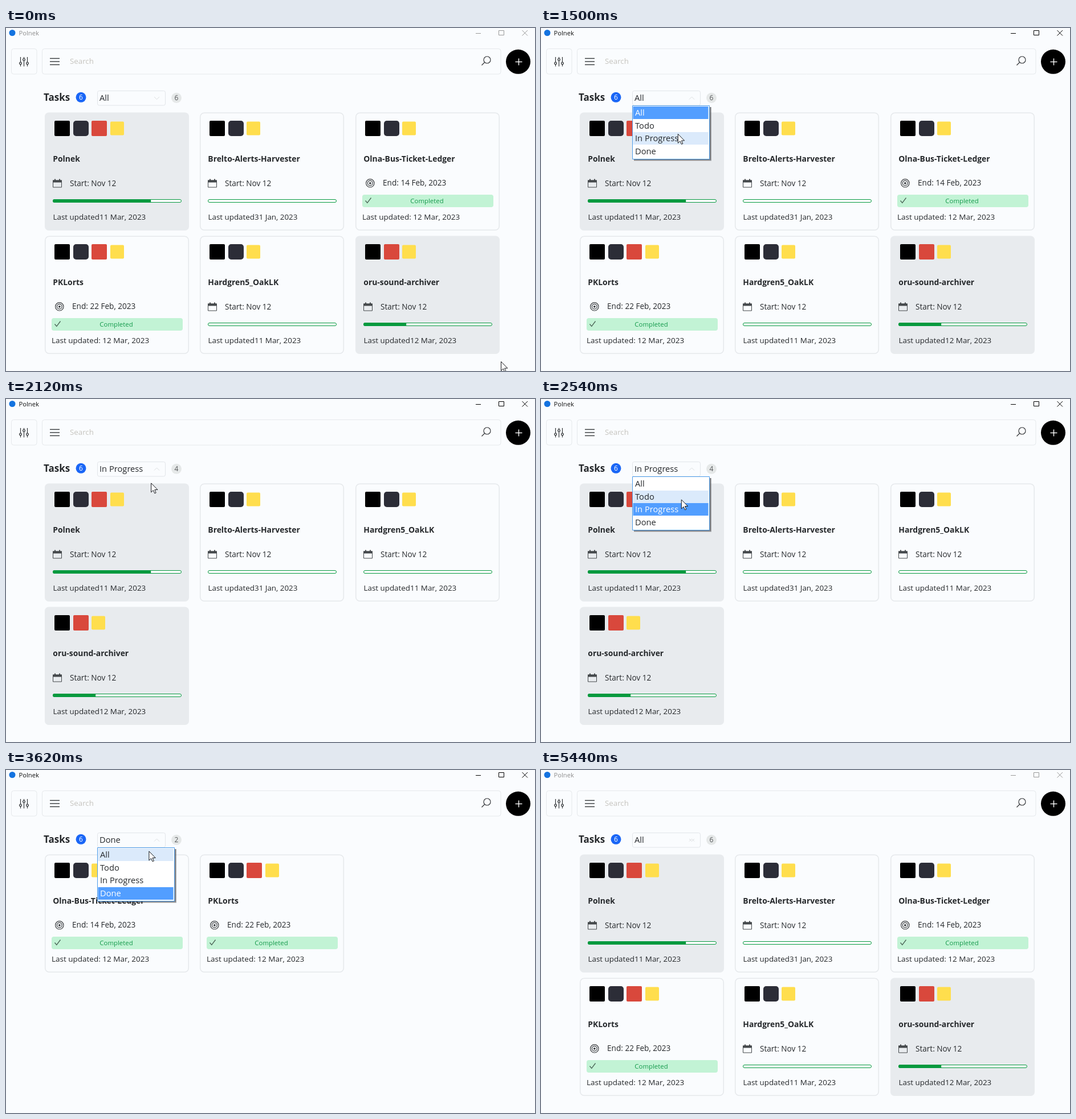
Animation, 928 px wide and 603 px high, one loop 5.52 s. Source, as an HTML page with a canvas:

```html
<!DOCTYPE html>
<html lang="en">
<head>
<meta charset="utf-8">
<title>Task board</title>
<style>
  html, body { margin: 0; width: 100%; height: 100%; overflow: hidden; background: #fafcfe; }
  canvas { display: block; width: 928px; height: 603px; }
</style>
</head>
<body>
<canvas id="stage"></canvas>
<script>
const W = 928, H = 603, LOOP = 5520, STEP = 60;
const BG = '#fafcfe', GRAY = '#e8ebee', EDGE = '#e6e9ec', INK = '#25282b', GREEN = '#079a3f';
const FONT = '"Open Sans", "Noto Sans", sans-serif';

const canvas = document.getElementById('stage');
const dpr = window.devicePixelRatio || 1;
canvas.width = W * dpr;
canvas.height = H * dpr;
const ctx = canvas.getContext('2d');

const OPTIONS = ['All', 'Todo', 'In Progress', 'Done'];
const TILE = { code: '#000000', draw: '#2c2d37', tick: '#d9483c', dir: '#ffde4d' };
const TASKS = [
  { name: 'Polnek', apps: 'code draw tick dir', done: 0.762, date: '11 Mar, 2023', shaded: true },
  { name: 'Brelto-Alerts-Harvester', apps: 'code draw dir', date: '31 Jan, 2023' },
  { name: 'Olna-Bus-Ticket-Ledger', apps: 'code draw dir', end: '14 Feb, 2023', date: '12 Mar, 2023' },
  { name: 'PKLorts', apps: 'code draw tick dir', end: '22 Feb, 2023', date: '12 Mar, 2023' },
  { name: 'Hardgren5_OakLK', apps: 'code draw dir', date: '11 Mar, 2023' },
  { name: 'oru-sound-archiver', apps: 'code tick dir', done: 0.333, date: '12 Mar, 2023', shaded: true }
];

// Each round: go to the select box, open the list, move to an option, pick it.
const ROUNDS = [
  { reach: 60, arrive: 660, open: 720, leave: 1200, pick: 1620, option: 2 },
  { reach: 1800, arrive: 2300, open: 2300, leave: 2300, pick: 2740, option: 3 },
  { reach: 2960, arrive: 3200, open: 3440, leave: 3440, pick: 3860, option: 0 }
];
const FADE_OUT = 120, FADE_IN = 150, BLUR = 5400;
const HOME = [868, 586], ARROW = [264, 121], EXIT = [862, 612];
const spot = option => [243 - 3.5 * option, 154 + 21 * option];

const MOVES = ROUNDS.flatMap(r => [
  [r.reach, r.arrive, ARROW],
  [r.leave, r.leave + 300 + 45 * r.option, spot(r.option)]
]).concat([[4620, 5140, EXIT]]);

const VIEWS = [{ option: 0, since: -LOOP }]
  .concat(ROUNDS.map(r => ({ option: r.option, since: r.pick + FADE_OUT })));
const LAST = VIEWS[ROUNDS.length].since;

const ramp = (t, a, b) => Math.max(0, Math.min(1, (t - a) / (b - a)));
const smooth = v => v * v * (3 - 2 * v);

function snap(t) {
  const base = t < ROUNDS[1].open ? 0 : ROUNDS[1].open;
  return base + Math.floor((t - base) / STEP) * STEP;
}

function pointerAt(t) {
  return MOVES.reduce(([x, y], [from, to, [tx, ty]]) => {
    const k = smooth(ramp(t, from, to));
    return [x + (tx - x) * k, y + (ty - y) * k];
  }, HOME);
}

function viewAt(t) {
  const i = VIEWS.filter(v => v.since < t).length - 1;
  const { option, since } = VIEWS[i];
  const out = i < ROUNDS.length ? ramp(t, ROUNDS[i].pick, ROUNDS[i].pick + FADE_OUT) : 0;
  const tasks = TASKS.filter(task => option === 0 || (option === 3) === Boolean(task.end));
  return { option, tasks, alpha: ramp(t, since, since + FADE_IN) * (1 - out) };
}

function text(str, x, y, size, color = INK, weight = 400, align = 'left') {
  ctx.font = `${weight} ${size}px ${FONT}`;
  ctx.fillStyle = color;
  ctx.textAlign = align;
  ctx.fillText(str, x, y);
}

function paint(fill, stroke, width) {
  if (fill) { ctx.fillStyle = fill; ctx.fill(); }
  if (stroke) { ctx.strokeStyle = stroke; ctx.lineWidth = width; ctx.stroke(); }
}

function box(x, y, w, h, r, fill, stroke, width = 1) {
  ctx.beginPath();
  ctx.roundRect(x, y, w, h, r);
  paint(fill, stroke, width);
}

function disc(x, y, r, fill, stroke, width = 1) {
  ctx.beginPath();
  ctx.arc(x, y, r, 0, Math.PI * 2);
  paint(fill, stroke, width);
}

function line(color, width, ...points) {
  ctx.beginPath();
  points.forEach(([x, y]) => ctx.lineTo(x, y));
  paint(null, color, width);
}

function hline(x, y, w, color, width) { line(color, width, [x, y], [x + w, y]); }
function vline(x, y, h, color, width) { line(color, width, [x, y], [x, y + h]); }

function titleBar(active) {
  const ink = active ? '#000' : '#999';
  disc(11, 8.5, 5.5, '#1473e0');
  text('Polnek', 22.5, 13, 11.2, active ? '#111' : '#8e8e8e');
  hline(824, 9.5, 9, ink, 1);
  box(864.5, 4.5, 9, 8, 0, null, ink);
  line(ink, 1, [905.5, 4], [915, 13.5]);
  line(ink, 1, [915, 4], [905.5, 13.5]);
}

function toolbar() {
  const dark = '#34373a';
  box(9.5, 36.5, 44.5, 44.5, 4, BG, EDGE);
  box(63.5, 36.5, 804.5, 44.5, 4, BG, EDGE);
  for (let i = 0; i < 3; i++) {
    const x = 25.5 + 6 * i;
    vline(x, 51, 16.5, dark, 1.2);
    disc(x, i === 1 ? 55.5 : 62, 1.9, BG, dark, 1.2);
    hline(77, 53.5 + 5.5 * i, 17, dark, 1.4);
  }
  text('Search', 112, 63, 13.3, '#c5c3be');
  disc(844, 56, 6, null, dark, 1.2);
  line(dark, 1.3, [839.5, 60.5], [834.5, 65.5]);
  disc(898.5, 59.3, 21.5, '#000');
  hline(893.5, 59.5, 12, '#fff', 1.4);
  vline(899.5, 53.5, 12, '#fff', 1.4);
}

function chevron(tip, ends) {
  line('#dcdfe1', 1, [260, ends], [264.5, tip], [269, ends]);
}

function heading(t, view) {
  text('Tasks', 66, 128, 17, INK, 700);
  disc(131.5, 121.8, 9, '#1a66f6');
  text('6', 131.5, 126, 12, '#fff', 400, 'center');

  box(160.5, 110.5, 119, 25.5, 3, BG, '#e2e5e9');
  text(OPTIONS[view.option], 164, 128, 14.7);
  if (t > LAST && t < 4680) vline(181.5, 114.5, 17, '#111', 1);
  if (t < ROUNDS[0].open || t > LAST) chevron(125.5, 121);
  if (t >= ROUNDS[0].open) chevron(121, 125.5);
  disc(299, 122.8, 9, '#e5e8e8');
  text(view.tasks.length, 299, 127, 12, '#55585a', 400, 'center');
}

function calendar(x, y) {
  const c = '#44484b';
  box(x + .5, y + 2.5, 15, 12, 0, null, c);
  box(x, y + 2, 16, 4, 0, c);
  for (const dx of [3, 11]) box(x + dx, y, 2, 4, 0, c);
}

function finished(task) {
  const dark = '#3b3e41';
  for (const r of [7.2, 4.4]) disc(25.8, 124.8, r, null, dark, 1.2);
  disc(25.8, 124.8, 1.9, dark);
  text('End: ' + task.end, 48, 129, 13.6);
  box(12, 145, 230, 22, 4, '#c2f3d5');
  line('#4c6658', 1.3, [17.5, 155.5], [20.8, 159.5], [27.5, 150.5]);
  text('Completed', 125.5, 160, 11.4, '#159a4c', 400, 'center');
  text('Last updated: ' + task.date, 12, 189, 13.5);
}

function ongoing(task) {
  calendar(14, 117.5);
  text('Start: Nov 12', 44, 130, 13.6);
  box(14.5, 153.5, 225, 5, 2.5, BG, GREEN);
  if (task.done) box(14, 153, 226 * task.done, 6, [3, 0, 0, 3], GREEN);
  text('Last updated' + task.date, 14.5, 189, 13.4);
}

function card(task, slot) {
  ctx.save();
  ctx.translate(68 + Math.round(slot % 3 * 272.25), 148 + Math.floor(slot / 3) * 217);
  if (task.shaded) box(0, .5, 253, 207.5, 7, GRAY);
  else box(.75, 1.25, 251.5, 206, 7, BG, EDGE, 1.6);
  task.apps.split(' ').forEach((app, i) => {
    const size = app === 'dir' ? 24 : 27;
    box(17 + Math.round(i * 32.6), 28.5 - size / 2, size, size, app === 'draw' ? 5 : 2, TILE[app]);
  });
  text(task.name, 14.3, 87, 13.9, INK, 700);
  (task.end ? finished : ongoing)(task);
  ctx.restore();
}

function menu(t, py) {
  const round = ROUNDS.findIndex(r => t >= r.open && t < r.pick);
  if (round < 0) return;
  const { open } = ROUNDS[round], selected = VIEWS[round].option;
  const rowH = 22.6, top = 138;
  const hover = Math.floor((py - top) / rowH);
  ctx.save();
  ctx.beginPath();
  ctx.rect(155, 136, 150, 100 * ramp(t, open - STEP, open + STEP));
  ctx.clip();
  for (const d of [3, 2]) box(163, 139, 133 + d, 91.5 + d, 0, 'rgba(60,64,68,.4)');
  box(160.5, 136.5, 135, 94, 0, '#fff', '#4a9bea');
  OPTIONS.forEach((name, i) => {
    const y = Math.round(top + i * rowH);
    const fill = i === selected ? '#529eff' : i === hover ? '#dbeafb' : null;
    box(161.5, y, 132, 22, 0, fill);
    text(name, 165, y + 16, 14.7, i === selected ? '#fff' : INK);
  });
  ctx.restore();
}

function pointer(x, y) {
  const shape = [[0, 0], [0, 16], [3.7, 12.5], [6.2, 18], [8.5, 17], [6.2, 11.6], [11.3, 11.6]];
  ctx.beginPath();
  shape.forEach(([dx, dy]) => ctx.lineTo(x + .5 + dx, y + .5 + dy));
  ctx.closePath();
  paint('#fff', '#15171c', 1);
}

function draw(t) {
  const [px, py] = pointerAt(t);
  const view = viewAt(t);
  ctx.setTransform(dpr, 0, 0, dpr, 0, 0);
  ctx.fillStyle = BG;
  ctx.fillRect(0, 0, W, H);
  titleBar(t >= ROUNDS[0].open && t < BLUR);
  toolbar();
  heading(t, view);
  ctx.globalAlpha = view.alpha;
  view.tasks.forEach(card);
  ctx.globalAlpha = 1;
  menu(t, py);
  pointer(px, py);
}

function tick(now) {
  draw(snap(now % LOOP));
  requestAnimationFrame(tick);
}
requestAnimationFrame(tick);
</script>
</body>
</html>
```
